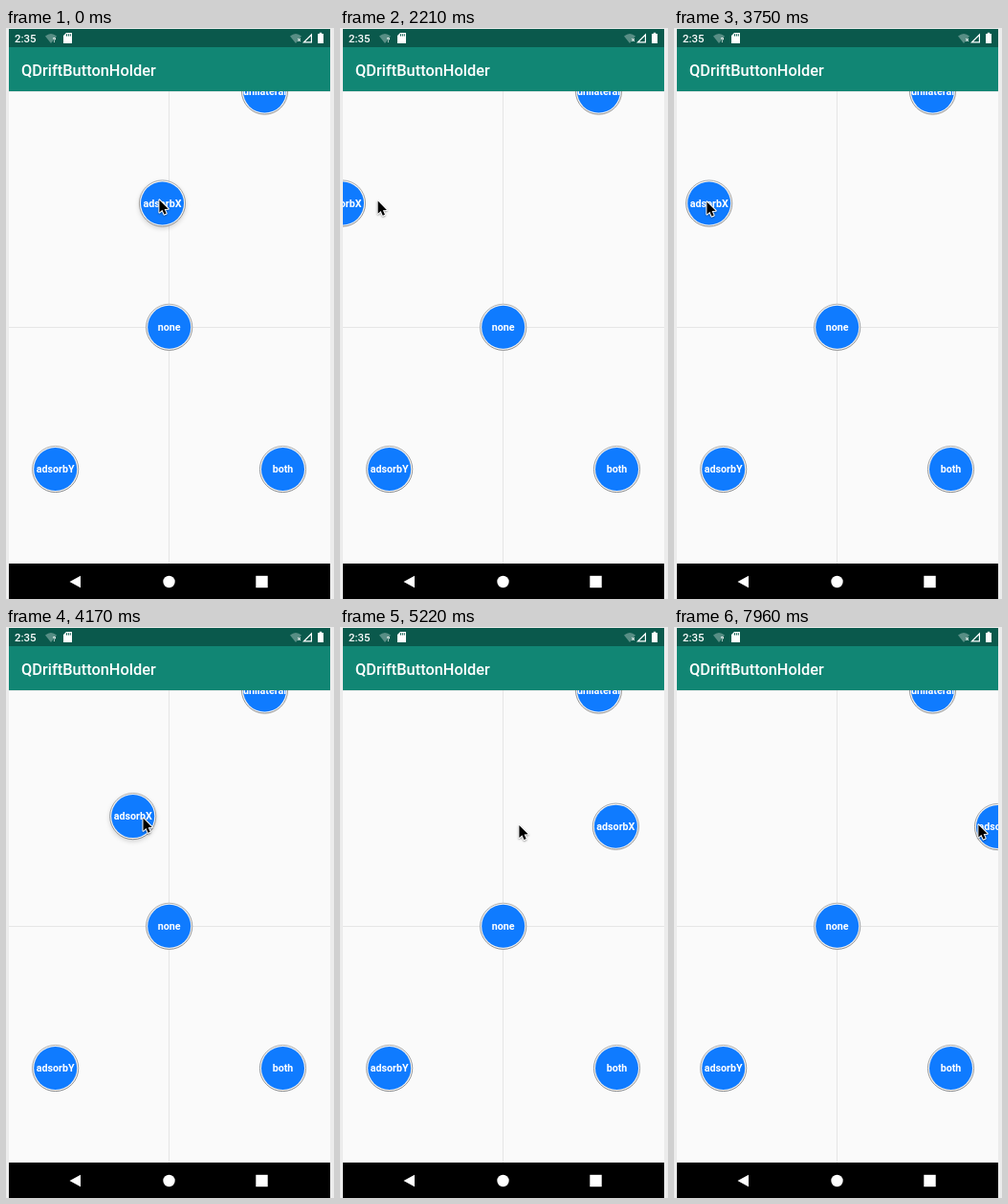
An HTML page with a canvas for the animation above (8 s loop, 343 by 596 pixels).

```html
<!DOCTYPE html>
<html lang="en">
<head>
<meta charset="utf-8">
<title>Floating buttons</title>
<style>
  html, body { margin: 0; width: 100%; height: 100%; overflow: hidden; background: #ececec; }
  canvas { display: block; width: 343px; height: 596px; }
</style>
</head>
<body>
<canvas id="stage"></canvas>
<script>
const W = 343, H = 596, LOOP = 8000;
const LEFT = 3, RIGHT = 339, TOP = 66, BOTTOM = 559;
const FIRST = 250, STEP = 137.7; // the screen refreshes in steps
const RADIUS = 24.3;

const canvas = document.getElementById('stage');
const ctx = canvas.getContext('2d');
const dpr = window.devicePixelRatio || 1;
canvas.width = W * dpr;
canvas.height = H * dpr;

const easeOut = k => 1 - (1 - k) ** 1.8;
const smooth = k => k * k * (3 - 2 * k);

// Resting places at the edges: shown, or tucked halfway behind them
const shown = { left: 36.7, right: 304.5 };
const tucked = { left: 2.5, right: 338.5 };
const grabbed = { from: 26, to: 33 };

const ballMoves = [
  { from: 0, to: 7, x: shown.left, y: 183, ease: easeOut },
  { from: 12, to: 15, x: tucked.left, y: 183, ease: smooth },
  { from: 20, to: 23, x: shown.left, y: 183, ease: smooth },
  { ...grabbed, x: 188, y: 206, ease: easeOut },
  { from: 33, to: 39, x: shown.right, y: 208.5, ease: easeOut },
  { from: 44, to: 47, x: tucked.right, y: 208.5, ease: smooth },
  { from: 56, to: 59, x: shown.right, y: 208.5, ease: smooth }
];
const cursorMoves = [
  { from: 0, to: 4, x: 147, y: 186, ease: easeOut },
  { from: 10, to: 18, x: 17, y: 179, ease: easeOut },
  { from: 21, to: 26, x: 34, y: 181, ease: easeOut },
  { from: 26, to: 32, x: 187, y: 206.5, ease: easeOut },
  { from: 41, to: 43, x: 191, y: 208, ease: easeOut },
  { from: 47, to: 53, x: 318, y: 206, ease: easeOut }
];

function follow(moves, x, y, step) {
  for (const m of moves) {
    if (step <= m.from) break;
    const k = m.ease(Math.min(1, (step - m.from) / (m.to - m.from)));
    x += (m.x - x) * k;
    y += (m.y - y) * k;
  }
  return [x, y];
}

function rect(x, y, w, h, color) {
  ctx.fillStyle = color;
  ctx.fillRect(x, y, w, h);
}

function disc(x, y, r, color) {
  ctx.fillStyle = color;
  ctx.beginPath();
  ctx.arc(x, y, r, 0, Math.PI * 2);
  ctx.fill();
}

function poly(points, color) {
  ctx.fillStyle = color;
  ctx.beginPath();
  points.forEach(([x, y]) => ctx.lineTo(x, y));
  ctx.closePath();
  ctx.fill();
}

function text(str, x, y, font, align = 'left') {
  ctx.fillStyle = '#fff';
  ctx.font = font + ' Roboto, sans-serif';
  ctx.textAlign = align;
  ctx.fillText(str, x, y);
}

function ball(x, y, label, lifted) {
  ctx.save();
  if (lifted) {
    ctx.shadowColor = 'rgba(0,0,0,.16)';
    ctx.shadowBlur = 5 * dpr;
    ctx.shadowOffsetY = 2 * dpr;
  }
  disc(x, y, RADIUS, '#f0f0f0');
  ctx.restore();
  const rim = ctx.createLinearGradient(0, y - RADIUS, 0, y + RADIUS);
  rim.addColorStop(0, '#a2a2a2');
  rim.addColorStop(1, '#777');
  ctx.strokeStyle = rim;
  ctx.lineWidth = 0.8;
  ctx.beginPath();
  ctx.arc(x, y, RADIUS - 0.2, 0, Math.PI * 2);
  ctx.stroke();
  disc(x, y, 22.5, '#0f7bff');
  text(label, x, y + 3.8, '700 10.7px', 'center');
}

function wifi(x, y, w, mark) {
  ctx.fillStyle = 'rgba(255,255,255,.32)';
  ctx.beginPath();
  ctx.moveTo(x + w / 2, y + 10);
  ctx.lineTo(x, y + 2.5);
  ctx.quadraticCurveTo(x + w / 2, y - 2.5, x + w, y + 2.5);
  ctx.fill();
  text(mark, x + w - 2.5, y + 9, '700 7px', 'center');
}

function statusBar() {
  const green = '#0a594c';
  rect(LEFT, 1, RIGHT - LEFT, 19, green);
  text('2:35', 9, 15, '500 11.5px');
  wifi(41, 6, 12, '?');
  poly([[63, 5], [69, 5], [69, 16], [60, 16], [60, 8]], '#fff');
  for (let i = 0; i < 3; i++) rect(63 + i * 1.9, 6.3, 1, 2.2, green);
  wifi(297, 6, 12, '×');
  poly([[320, 5.5], [320, 15.5], [310, 15.5]], '#fff');
  poly([[318.8, 8.5], [318.8, 14.3], [313, 14.3]], green);
  rect(326, 6, 6, 10, '#fff');
  rect(327.8, 4.8, 2.4, 1.4, '#fff');
}

function appBar() {
  rect(LEFT, 20, RIGHT - LEFT, TOP - 20, '#118674');
  text('QDriftButtonHolder', 16, 49.5, '500 16.4px');
  rect(LEFT, TOP, RIGHT - LEFT, 1, 'rgba(0,0,0,.06)');
}

function navBar() {
  rect(LEFT, BOTTOM, RIGHT - LEFT, H - BOTTOM, '#000');
  poly([[66.5, 578], [78, 571.8], [78, 584.2]], '#fff');
  disc(170.5, 578, 6.2, '#fff');
  rect(261.3, 571.8, 12.4, 12.4, '#fff');
}

function cursor(x, y) {
  const arrow = [[0, 0], [0, 13.2], [3, 10.4], [5.1, 15.2], [7.3, 14.2], [5.2, 9.6], [9.3, 9.4]];
  ctx.save();
  ctx.translate(x + 0.4, y + 0.4);
  ctx.shadowColor = 'rgba(0,0,0,.3)';
  ctx.shadowBlur = 2 * dpr;
  ctx.shadowOffsetY = dpr;
  poly(arrow, '#fff');
  ctx.strokeStyle = '#fff';
  ctx.lineWidth = 2;
  ctx.lineJoin = 'round';
  ctx.stroke();
  ctx.shadowColor = 'transparent';
  poly(arrow, '#000');
  ctx.restore();
}

function draw(time) {
  const step = Math.max(0, Math.floor((time - FIRST) / STEP) + 1);
  const lifted = step === 0 || (step > grabbed.from && step < grabbed.to);

  ctx.setTransform(dpr, 0, 0, dpr, 0, 0);
  rect(0, 0, W, H, '#ececec');
  rect(LEFT, TOP, RIGHT - LEFT, BOTTOM - TOP, '#fafafa');
  rect(170, TOP, 1, BOTTOM - TOP, '#e6e6e6');
  rect(LEFT, 312, RIGHT - LEFT, 1, '#e6e6e6');

  ctx.save();
  ctx.beginPath();
  ctx.rect(LEFT, TOP, RIGHT - LEFT, BOTTOM - TOP);
  ctx.clip();
  ball(270.5, 66, 'unilateral');
  ball(51.7, 460.5, 'adsorbY');
  ball(289.5, 460.5, 'both');
  ball(170.7, 312.3, 'none');
  ball(...follow(ballMoves, 163.5, 183, step), 'adsorbX', lifted);
  ctx.restore();

  statusBar();
  appBar();
  navBar();
  cursor(...follow(cursorMoves, 160, 179, step));
}

function frame() {
  draw(performance.now() % LOOP);
  requestAnimationFrame(frame);
}
frame();
</script>
</body>
</html>
```
